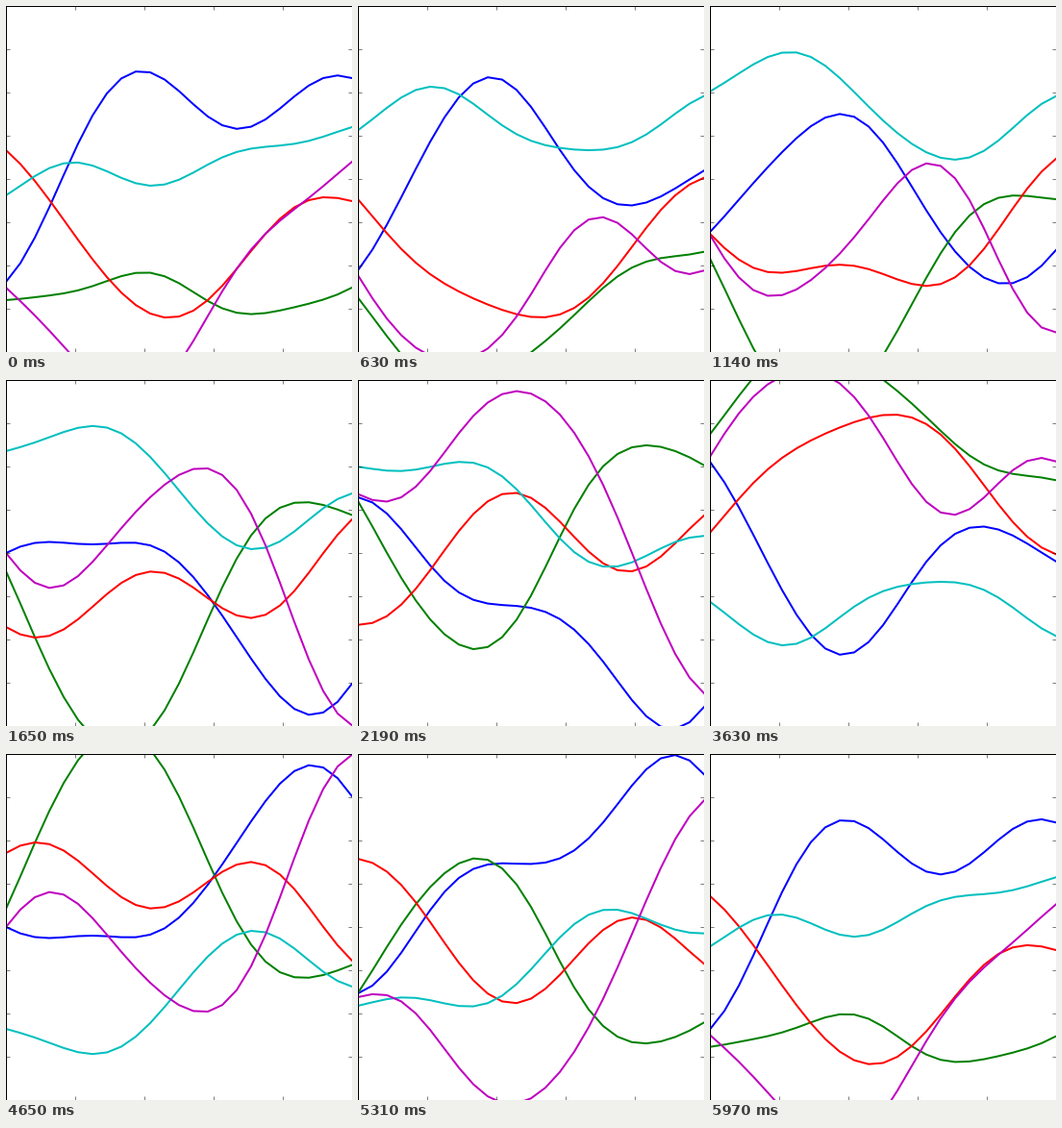
Recreate the animation shown at these times as a matplotlib script. Size 360x360 px, loop 6000 ms.

```python
import numpy as np
import matplotlib.pyplot as plt
from matplotlib.animation import FuncAnimation

SIZE, FRAMES, INTERVAL = 360, 200, 30
MID = SIZE / 2
SPAN = 0.55 * np.pi  # phase angle between the two key shapes
SCALE = 72           # length scale of the smooth curves

# Key heights of each curve at phase 0 and at phase SPAN
KNOTS = np.array([0, 30, 90, 150, 210, 270, 330, 360])
CURVES = {
    "b": ([287, 241, 114, 69, 115, 118, 75, 75],
          [180, 169.5, 171, 172, 224, 311, 346, 316]),
    "g": ([306, 303, 291.5, 277.5, 307, 319.5, 305.5, 293],
          [199, 267.5, 371, 365, 249, 144, 130, 140.5]),
    "r": ([150, 182, 263.5, 320, 306, 237, 199, 203],
          [257, 268, 236, 199.3, 227, 244.3, 180.3, 145]),
    "c": ([197, 177, 166, 187, 165, 146.5, 136, 126],
          [74, 65, 47.8, 80, 149.3, 174.5, 133.5, 118]),
    "m": ([293, 322, 386, 403.5, 322.5, 237, 187.5, 162],
          [180, 211, 189.3, 122, 92, 172, 323.5, 359.3]),
}


def kernel(a, b):
    return np.exp(-0.5 * ((a[:, None] - b) / SCALE) ** 2)


x = np.linspace(0, SIZE, 25)
gram = kernel(KNOTS, KNOTS) + 1e-5 * np.eye(len(KNOTS))
weights = np.linalg.solve(gram, kernel(KNOTS, x)).T


def smooth(heights):
    """Gaussian process mean through the key heights."""
    return weights @ (np.array(heights) - MID)


def blend(start, end, phase):
    """Point on the great circle through two function samples."""
    return MID + (start * np.sin(SPAN - phase) + end * np.sin(phase)) / np.sin(SPAN)


fig = plt.figure(figsize=(5, 5), dpi=72, facecolor="white")
ax = fig.add_axes([0, 0, 1, 1])
ax.set(xlim=(0, SIZE), ylim=(SIZE, 0),
       xticks=np.arange(0, SIZE + 1, 72), yticks=np.arange(0, SIZE + 1, 45))
ax.set_axisbelow(False)
ax.tick_params(direction="in", length=4, width=0.5, top=True, right=True,
               labelbottom=False, labelleft=False)
for spine in ax.spines.values():
    spine.set_linewidth(1)

samples = [(smooth(a), smooth(b)) for a, b in CURVES.values()]
lines = [ax.plot(x, np.full_like(x, MID), color=c, lw=2)[0] for c in CURVES]


def update(i):
    phase = 2 * np.pi * i / FRAMES
    for line, (start, end) in zip(lines, samples):
        line.set_ydata(blend(start, end, phase))
    return lines


anim = FuncAnimation(fig, update, frames=FRAMES, interval=INTERVAL, repeat=True)
plt.show()
```
